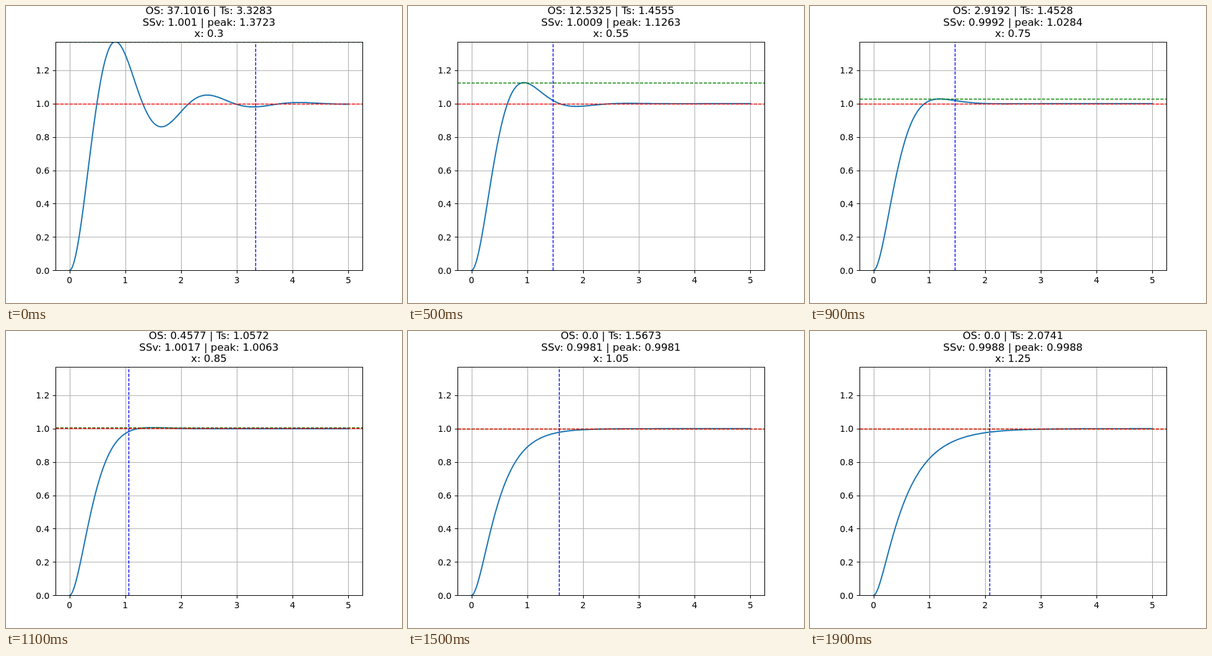
An HTML page that plays this animation: 640 px wide and 480 px high, repeating every 2 s.

```html
<!DOCTYPE html>
<html lang="en">
<head>
<meta charset="utf-8">
<title>Step response by damping ratio</title>
<style>
  html, body { margin: 0; width: 100%; height: 100%; overflow: hidden; background: #fff; }
  svg { display: block; width: 640px; height: 480px; }
  text { font-family: "DejaVu Sans", sans-serif; font-size: 13.889px; }
  .title { font-size: 16.667px; text-anchor: middle; }
  .xlabel { text-anchor: middle; }
  .ylabel { text-anchor: end; }
  path { fill: none; }
  .grid { stroke: #b0b0b0; stroke-width: 1.111; }
  .axis { stroke: #000; stroke-width: 1.111; }
  .curve { stroke: #1f77b4; stroke-width: 2.083; stroke-linejoin: round; stroke-linecap: square; }
  .guide { stroke-width: 1.389; stroke-dasharray: 5.139 2.222; }
</style>
</head>
<body>
<svg viewBox="0 0 640 480">
  <defs><clipPath id="plot"><rect x="80" y="58" width="496" height="369"/></clipPath></defs>
</svg>
<script>
const STEP_MS = 100, STEPS = 20, OMEGA = 4, SAMPLES = 1000;
const LEFT = 80.5, RIGHT = 576.5, TOP = 58.5, BOTTOM = 427.5;
const Y_MAX = 1.37233;

const svg = document.querySelector("svg");

function add(tag, attrs, parent = svg) {
  const node = document.createElementNS("http://www.w3.org/2000/svg", tag);
  for (const key in attrs) node.setAttribute(key, attrs[key]);
  return parent.appendChild(node);
}

function label(cls, x, y, content = "") {
  const node = add("text", { class: cls, x, y });
  node.textContent = content;
  return node;
}

const toX = t => 80 + 496 / 22 + t * 496 / 5.5;
const toY = v => 427.2 - v * 369.6 / Y_MAX;
const snap = p => Math.floor(p + 0.5) + 0.5;
const hLine = v => `M${LEFT} ${snap(toY(v))}H${RIGHT}`;
const vLine = t => `M${snap(toX(t))} ${BOTTOM}V${TOP}`;

// Unit step response of a second-order system with damping ratio z
function response(z, t) {
  const a = z * OMEGA;
  if (Math.abs(z - 1) < 1e-6) return 1 - (1 + a * t) * Math.exp(-a * t);
  if (z < 1) {
    const root = Math.sqrt(1 - z * z);
    return 1 - Math.exp(-a * t) * Math.sin(OMEGA * root * t + Math.acos(z)) / root;
  }
  const d = OMEGA * Math.sqrt(z * z - 1), slow = a - d, fast = a + d;
  return 1 - (fast * Math.exp(-slow * t) - slow * Math.exp(-fast * t)) / (fast - slow);
}

// Figures measured over seven time constants of the slowest pole
function measure(z) {
  const pole = OMEGA * (z > 1 ? z - Math.sqrt(z * z - 1) : z);
  const dt = 7 / pole / (SAMPLES - 1);
  const values = Array.from({ length: SAMPLES }, (_, i) => response(z, i * dt));
  const steady = values[SAMPLES - 1], peak = Math.max(...values);
  let last = SAMPLES - 1;
  while (Math.abs(values[last] - steady) < 0.02 * steady) last--;
  return { steady, peak, settling: (last + 1) * dt, overshoot: 100 * (peak / steady - 1) };
}

function format(v) {
  const n = Number(v.toFixed(4));
  return Number.isInteger(n) ? n.toFixed(1) : String(n);
}

const xTicks = [0, 1, 2, 3, 4, 5];
const yTicks = [0, 0.2, 0.4, 0.6, 0.8, 1, 1.2];

const plot = add("g", { "clip-path": "url(#plot)" });
add("path", { class: "grid", d: xTicks.map(vLine).join("") + yTicks.map(hLine).join("") }, plot);
const curve = add("path", { class: "curve" }, plot);
const peakLine = add("path", { class: "guide", stroke: "#008000" }, plot);
const steadyLine = add("path", { class: "guide", stroke: "#f00" }, plot);
const settlingLine = add("path", { class: "guide", stroke: "#00f" }, plot);

add("path", {
  class: "axis",
  d: `M${LEFT} ${TOP}H${RIGHT}V${BOTTOM}H${LEFT}Z`
    + xTicks.map(t => `M${snap(toX(t))} ${BOTTOM}v4.86`).join("")
    + yTicks.map(v => `M${LEFT} ${snap(toY(v))}h-4.86`).join("")
});
xTicks.forEach(t => label("xlabel", toX(t), 448, t));
yTicks.forEach(v => label("ylabel", 70.3, Math.round(toY(v) + 5.3), v.toFixed(1)));
const titles = [13, 32, 50].map(y => label("title", 328, y));

function show(step) {
  const z = Math.round(30 + 5 * step) / 100;
  const m = measure(z);
  const points = Array.from({ length: 501 }, (_, i) =>
    `${toX(i / 100).toFixed(2)} ${toY(response(z, i / 100)).toFixed(2)}`);
  curve.setAttribute("d", "M" + points.join("L"));
  peakLine.setAttribute("d", hLine(m.peak));
  steadyLine.setAttribute("d", hLine(m.steady));
  settlingLine.setAttribute("d", vLine(m.settling));
  titles[0].textContent = `OS: ${format(m.overshoot)} | Ts: ${format(m.settling)}`;
  titles[1].textContent = `SSv: ${format(m.steady)} | peak: ${format(m.peak)}`;
  titles[2].textContent = `x: ${format(z)}`;
}

let shown = -1;
function tick() {
  const step = Math.floor(performance.now() / STEP_MS) % STEPS;
  if (step !== shown) show(shown = step);
  requestAnimationFrame(tick);
}
tick();
</script>
</body>
</html>
```
